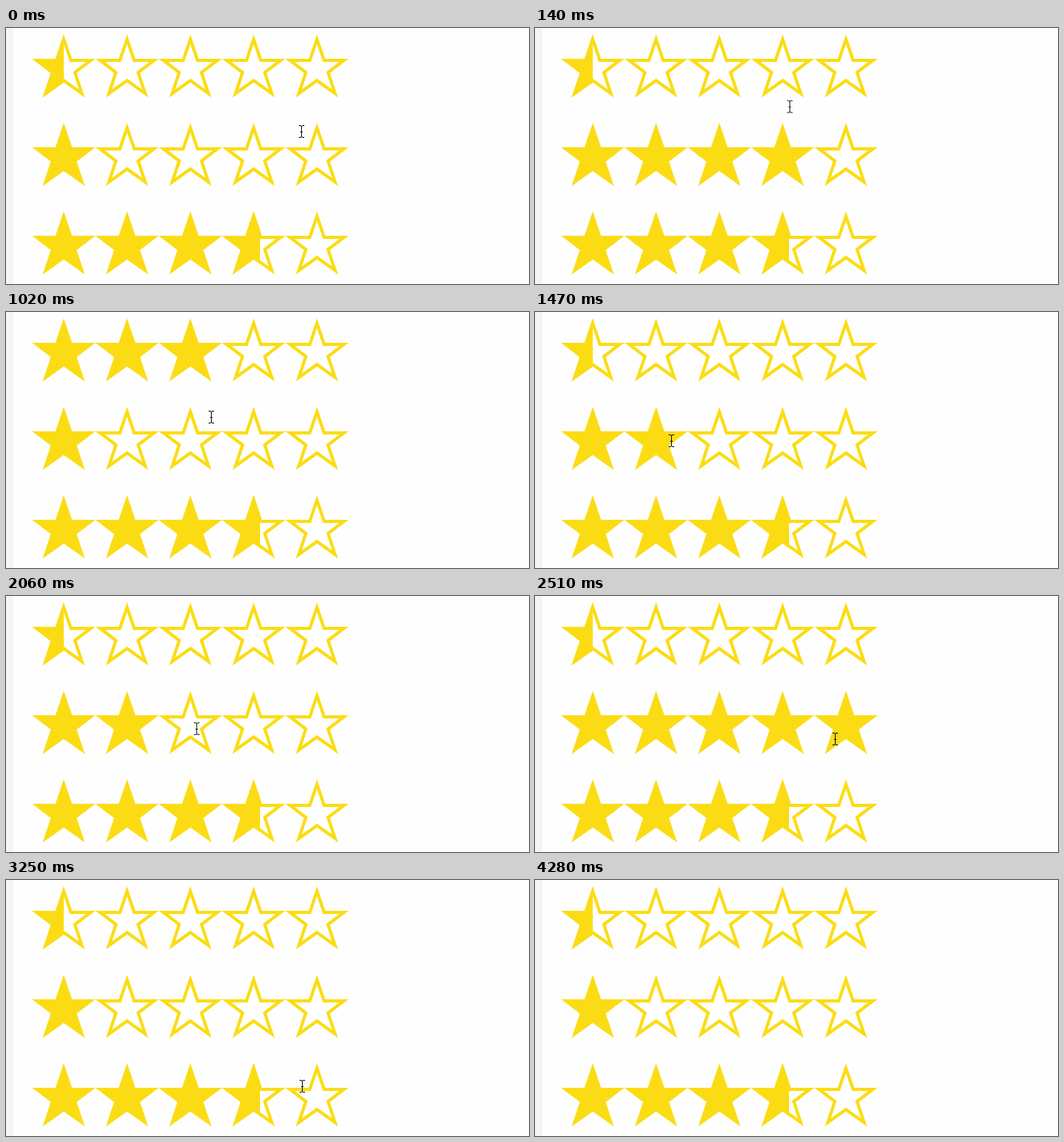
These frames come from a looping animation (661x324 px, 5180 ms). An HTML page with a canvas:

```html
<!DOCTYPE html>
<html lang="en">
<head>
<meta charset="utf-8">
<title>Star ratings</title>
<style>
  html, body { margin: 0; width: 100%; height: 100%; overflow: hidden; background: #fefefe; }
  canvas { display: block; }
</style>
</head>
<body>
<canvas id="stage" width="661" height="324"></canvas>
<script>
const ctx = document.getElementById('stage').getContext('2d');
const LOOP = 5180, TICK = 148, TICK_OFFSET = 16, LAST_TICK = 28;
const YELLOW = '#fbdc14';
const CELL = 80, LEFT = 33, TOP = 8, ROW_STEP = 112;
const REST = [0.5, 1, 3.6];

// Key points of the pointer path: tick, x, y.
const path = [
  [0, 373.5, 131], [2, 270.5, 68], [5, 268.5, 67], [6, 252.5, 66],
  [7, 259.5, 133], [8, 258.5, 163], [10, 172.5, 163], [13, 120.5, 167],
  [15, 361.5, 169], [17, 379.5, 181], [18, 487, 261], [19, 478, 264],
  [20, 383.5, 260], [22, 374.5, 261], [23, 291.5, 266], [26, 216.5, 273]
];

// The rating chosen by hovering, from each tick on.
const hovers = [
  { from: 1, row: 1, rating: 4 },
  { from: 2, row: 0, rating: 4 },
  { from: 3, row: 0, rating: 3 },
  { from: 8, row: 1, rating: 3 },
  { from: 10, row: 1, rating: 2 },
  { from: 15, row: 1, rating: 5 },
  { from: 18 }
];

// Right half of the star, measured from its top point.
const half = [[0, 0], [10.5, 31], [40, 31], [16.4, 49], [26.7, 80], [0, 61]];
const outline = [...half, ...half.slice(1, 5).reverse().map(([x, y]) => [-x, y])];
const star = new Path2D('M' + outline.join('L') + 'Z');
const arrow = new Path2D('M.5 .5V15.5L4 12.3L6.6 18.2L9 17.2L6.5 11.5H11.5Z');
const beam = new Path2D(
  'M-3.5 -7.5H-1.5Q0 -7.5 0 -6Q0 -7.5 1.5 -7.5H3.5' +
  'M0 -6V6M-1.5 .5H1.5' +
  'M-3.5 7.5H-1.5Q0 7.5 0 6Q0 7.5 1.5 7.5H3.5');

const ease = u => u * u * (3 - 2 * u);

function pointerAt(tick) {
  const next = path.findIndex(key => key[0] > tick);
  if (next < 0) return path.at(-1).slice(1);
  const [t0, x0, y0] = path[next - 1];
  const [t1, x1, y1] = path[next];
  const u = ease((tick - t0) / (t1 - t0));
  return [x0 + (x1 - x0) * u, y0 + (y1 - y0) * u];
}

function at(x, y, paint) {
  ctx.save();
  ctx.translate(x, y);
  paint();
  ctx.restore();
}

function drawStar(x, y, filled) {
  at(x, y, () => {
    ctx.fillStyle = YELLOW;
    if (filled >= 1) return ctx.fill(star);
    ctx.clip(star);
    ctx.fillStyle = '#fff';
    ctx.fill(star);
    ctx.strokeStyle = ctx.fillStyle = YELLOW;
    ctx.lineWidth = 8;
    ctx.stroke(star);
    ctx.fillRect(-CELL / 2, 0, CELL * filled, CELL);
  });
}

function drawPointer(x, y) {
  const overStars = x < LEFT + 5 * CELL;
  at(x, y, () => {
    ctx.fillStyle = ctx.strokeStyle = '#111';
    if (overStars) ctx.stroke(beam);
    else ctx.fill(arrow);
  });
}

function draw(time) {
  const tick = Math.floor((time % LOOP + TICK_OFFSET) / TICK);
  const hover = hovers.findLast(h => h.from <= tick);
  ctx.fillStyle = '#fefefe';
  ctx.fillRect(0, 0, 661, 324);
  ctx.fillStyle = '#f4f4f4';
  ctx.fillRect(0, 0, 9, 324);
  REST.forEach((rest, row) => {
    const value = row === hover?.row ? hover.rating : rest;
    for (let i = 0; i < 5; i++) {
      const filled = Math.min(1, Math.max(0, value - i));
      drawStar(LEFT + CELL * (i + 0.5), TOP + ROW_STEP * row, filled);
    }
  });
  if (tick <= LAST_TICK) drawPointer(...pointerAt(tick));
}

const start = performance.now();
function frame() {
  draw(performance.now() - start);
  requestAnimationFrame(frame);
}
frame();
</script>
</body>
</html>
```
